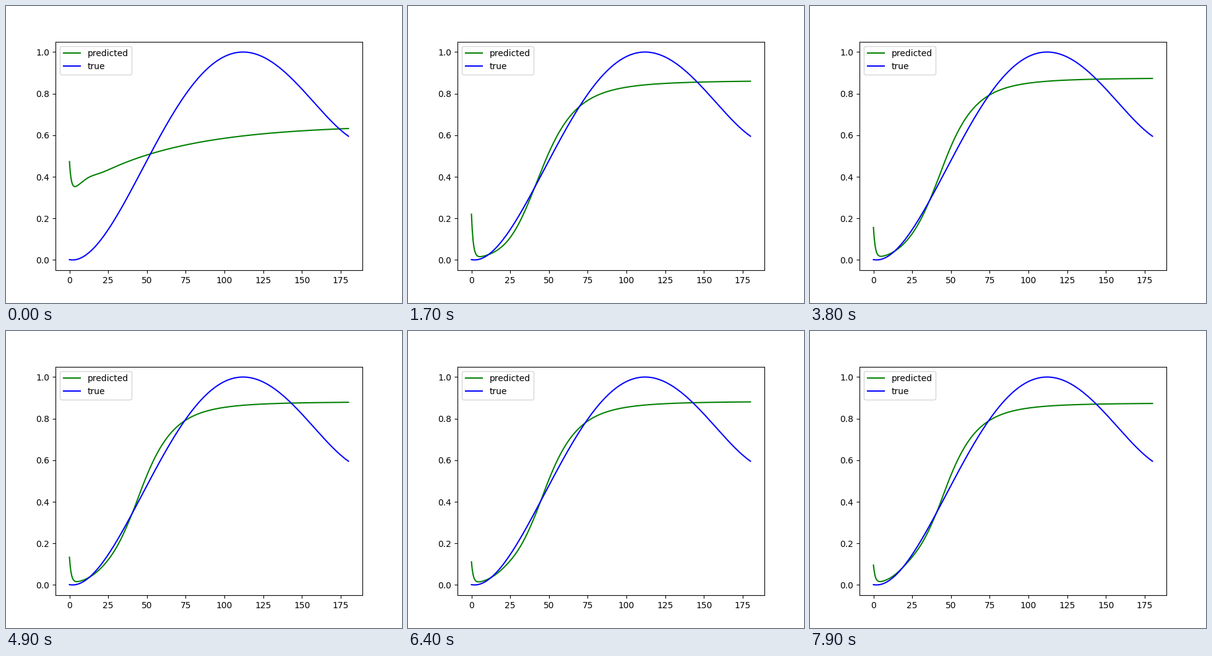
Write a matplotlib script that moves like this. It is 640 by 480 pixels and loops after 8000 ms.

```python
import matplotlib.pyplot as plt
import numpy as np
from matplotlib.animation import FuncAnimation

STEPS, INTERVAL = 80, 100
x = np.linspace(0, 180, 361)


def logit(p):
    return np.log(p / (1 - p))


def sigmoid(z):
    return 1 / (1 + np.exp(-z))


def bump(center, width):
    return np.exp(-((x - center) / width) ** 2)


def spike(y, start):
    """Let the curve fall quickly from the start height onto y."""
    return y + (start - y[0]) * np.exp(-x / 1.15)


# Quartic with turning points at 2, 112 and 193, scaled to the range 0..1.
slope = np.poly1d([2, 112, 193], r=True)
area = slope.integ()
true = (area(x) - area(2)) / (area(112) - area(2))

untrained = spike(.65 - .325 * np.exp(-x / 62) + .013 * bump(12, 7), .473)

rng = np.random.default_rng(4)
jitter = rng.normal(size=(STEPS, 2)) * [.002, .02]


def trained(n):
    t = n * INTERVAL / 1000
    age = max(t - 1.7, 0)
    top = .881 - .0011 * (t - 5.5) ** 2 + jitter[n, 0]
    sway = .12 * np.sin(2 * np.pi * (t - 1.7) / 6.2) + jitter[n, 1]
    z = -3.62 + 7.06 * np.arctan((x - 10) / 63) + sway
    z += .065 * age * bump(17, 13)
    z += .0028 * np.sqrt(age) * np.maximum(x - 42, 0)
    return spike(top * sigmoid(z), .06 + .242 * np.exp(-t / 4.1))


def predict(n):
    w = .35**n
    return sigmoid(w * logit(untrained) + (1 - w) * logit(trained(n)))


fig, ax = plt.subplots(figsize=(6.4, 4.8), dpi=100)
predicted, = ax.plot(x, untrained, color="green", label="predicted")
ax.plot(x, true, color="blue", label="true")
ax.set_xlim(-9, 189)
ax.set_ylim(-.05, 1.05)
ax.legend(loc="upper left")


def update(n):
    predicted.set_ydata(predict(n))
    return predicted,


anim = FuncAnimation(fig, update, frames=STEPS, interval=INTERVAL, repeat=True,
                     repeat_delay=0)
plt.show()
```
